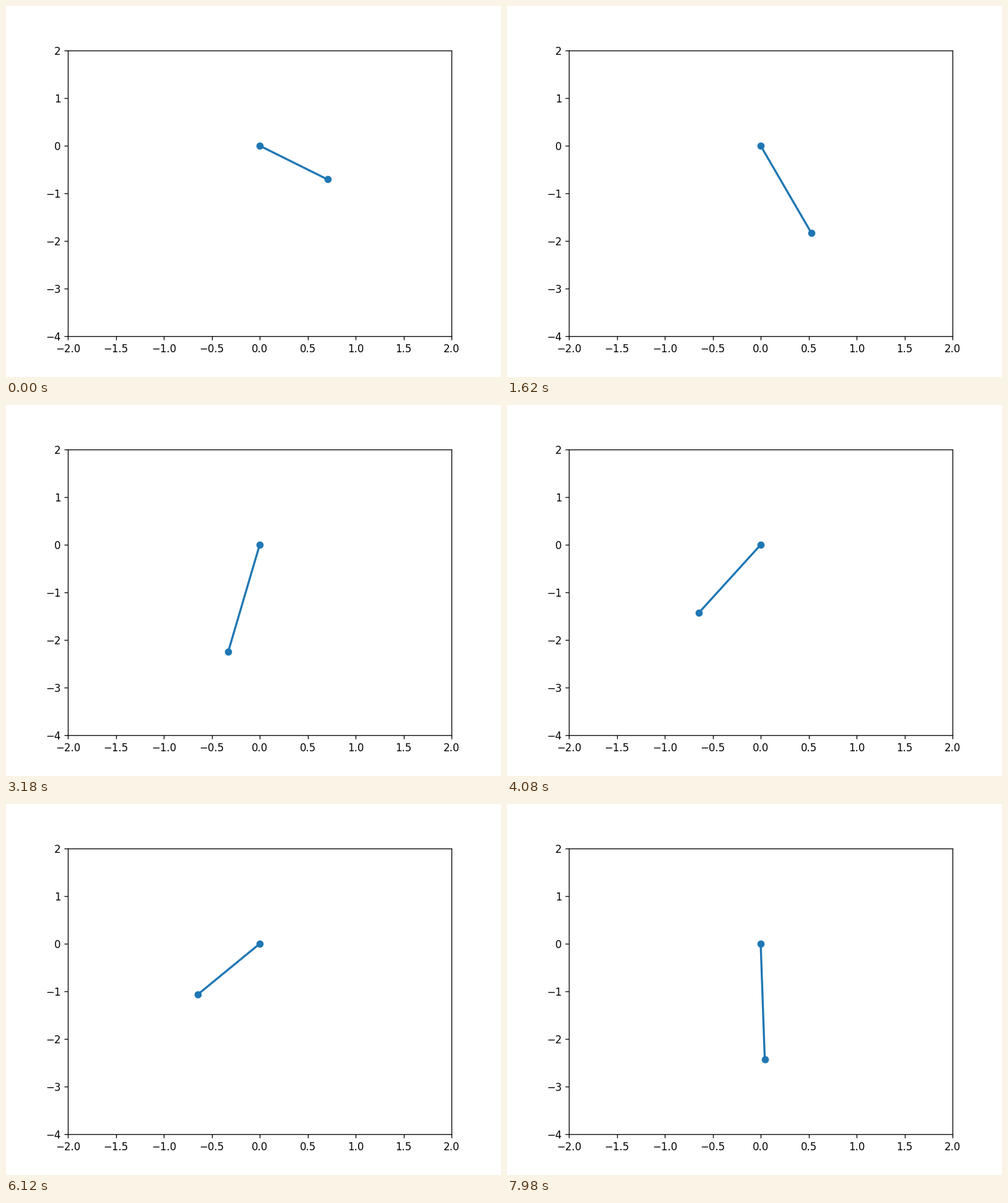
A matplotlib script for the animation above (8000 ms loop, 800 by 600 pixels).

```python
import numpy as np
import matplotlib.pyplot as plt
from matplotlib.animation import FuncAnimation

G = 9.81          # gravity
STIFFNESS = 15.0  # spring constant per unit mass
REST = 1.0        # natural spring length
DT = 10 / 999     # simulated seconds per frame
FRAMES = 267
INTERVAL = 30     # ms
DPI = 120


def derivative(state):
    pos, vel = state[:2], state[2:]
    length = np.hypot(*pos)
    acc = -STIFFNESS * (length - REST) * pos / length
    acc[1] -= G
    return np.concatenate([vel, acc])


def rk4_step(state, h):
    k1 = derivative(state)
    k2 = derivative(state + h / 2 * k1)
    k3 = derivative(state + h / 2 * k2)
    k4 = derivative(state + h * k3)
    return state + h / 6 * (k1 + 2 * k2 + 2 * k3 + k4)


def simulate():
    angle = np.pi / 4
    state = np.array([REST * np.sin(angle), -REST * np.cos(angle), 0.0, 0.0])
    path = [state[:2]]
    for _ in range(FRAMES - 1):
        state = rk4_step(state, DT)
        path.append(state[:2])
    return np.array(path)


path = simulate()

fig, ax = plt.subplots(figsize=(800 / DPI, 600 / DPI), dpi=DPI)
ax.set_xlim(-2, 2)
ax.set_ylim(-4, 2)
spring, = ax.plot([], [], "o-", color="tab:blue", lw=2)


def update(i):
    x, y = path[i]
    spring.set_data([0, x], [0, y])
    return spring,


anim = FuncAnimation(fig, update, frames=FRAMES, interval=INTERVAL,
                     repeat=True, repeat_delay=0, blit=True)
plt.show()
```
